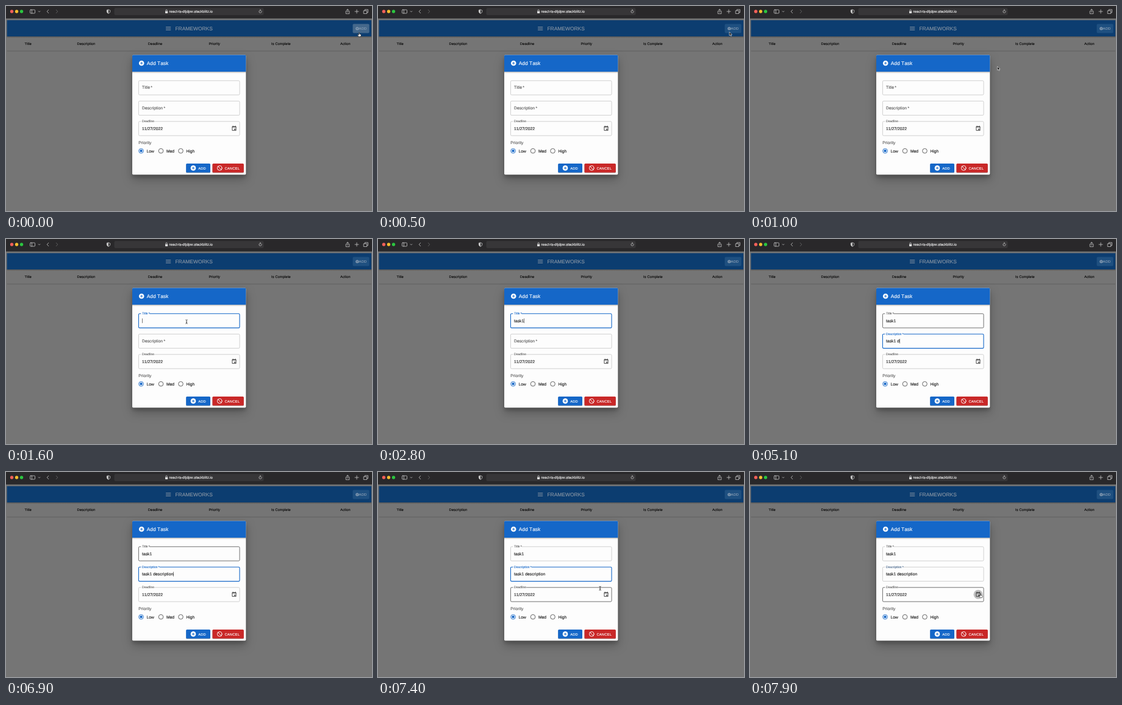
Recreate the animation shown at these times as an HTML page. Size 600 by 337 pixels, loop 8000 ms.

```html
<!DOCTYPE html>
<html lang="en">
<head>
<meta charset="utf-8">
<title>Add Task</title>
<style>
  html, body { margin: 0; width: 100%; height: 100%; overflow: hidden; background: #757575; }
  svg { display: block; width: 100vw; height: 100vh; font-family: "Liberation Sans", Arial, sans-serif; }
  text {
    white-space: pre; font-kerning: none; text-rendering: geometricPrecision;
    fill: currentColor; stroke: currentColor; stroke-width: .13px;
  }
  .body { font-size: 6.7px; letter-spacing: .06px; }
  .small { font-size: 5.85px; letter-spacing: .06px; }
  .button { font-size: 5.83px; letter-spacing: .17px; }
  .line { fill: none; stroke-linecap: round; stroke-linejoin: round; }
</style>
</head>
<body>
<svg id="stage" viewBox="0 0 600 337">
  <defs>
    <filter id="shadow" x="-30%" y="-30%" width="160%" height="170%" color-interpolation-filters="sRGB">
      <feDropShadow dx="0" dy="4.6" stdDeviation="2.6" flood-opacity=".16"/>
      <feDropShadow dx="0" dy="7" stdDeviation="8" flood-opacity=".26"/>
    </filter>
    <filter id="lift" x="-20%" y="-30%" width="140%" height="180%" color-interpolation-filters="sRGB">
      <feDropShadow dx="0" dy=".8" stdDeviation=".7" flood-opacity=".3"/>
    </filter>
    <filter id="soft" x="-10%" y="-200%" width="120%" height="500%"><feGaussianBlur stdDeviation="5 1.2"/></filter>
    <linearGradient id="under" x2="0" y2="1">
      <stop stop-opacity=".28"/><stop offset="1" stop-opacity="0"/>
    </linearGradient>
    <g id="plus">
      <circle r="4.3" fill="#fff"/>
      <path d="M-2.2 0H2.2M0-2.2V2.2" stroke="#1567c8" stroke-width=".95"/>
    </g>
  </defs>

  <!-- Page behind the dialog -->
  <rect width="600" height="337" fill="#757575"/>
  <rect x="1.5" y="23.3" width="597.5" height="26.7" fill="#0c3d70"/>
  <rect x="1.5" y="50" width="597.5" height="2.6" fill="url(#under)"/>
  <path d="M262 34.6h8.2M262 37h8.2M262 39.4h8.2" stroke="#8b97a5" stroke-width=".9"/>
  <text x="277.4" y="39.6" font-size="8.38" letter-spacing=".05" color="#8b97a5">FRAMEWORKS</text>
  <rect x="568.5" y="29.5" width="27" height="15" rx="1.7" fill="#1f5080"/>
  <rect id="press" x="568.5" y="29.5" width="27" height="15" rx="1.7" fill="#7f8c9a"/>
  <circle cx="575.8" cy="37" r="2.6" fill="#8b9fb4"/>
  <path d="M574.4 37h2.8M575.8 35.6v2.8" stroke="#1f5080" stroke-width=".6"/>
  <text x="578.6" y="39.2" class="button" color="#8b9fb4">ADD</text>
  <g id="columns" class="small" color="#0c0c0c"></g>
  <path d="M1.5 74H599" stroke="#585858" stroke-width=".7"/>
  <path d="M88 337H512" stroke="#333" stroke-width="2.4" filter="url(#soft)"/>

  <!-- Browser toolbar -->
  <rect width="600" height="20.5" fill="#29282a"/>
  <circle cx="9.5" cy="9" r="2.7" fill="#f6605a"/>
  <circle cx="17.5" cy="9" r="2.7" fill="#f7bd2e"/>
  <circle cx="25.5" cy="9" r="2.7" fill="#2bc640"/>
  <g class="line" stroke="#c8c8c8" stroke-width=".8">
    <rect x="39.5" y="6.2" width="8" height="5.8" rx="1"/>
    <path d="M42.3 6.2v5.8M53.2 8.5l1.3 1.3 1.3-1.3M69.8 6.3L67.2 9l2.6 2.7"/>
    <path d="M82.2 6.3L84.8 9l-2.6 2.7" stroke="#6a6a6a"/>
    <path d="M168 6l2.7 1v2.2q0 2-2.7 3.2q-2.7-1.2-2.7-3.2V7z"/>
    <path d="M168 6v6.4q-2.7-1.2-2.7-3.2V7z" fill="#c8c8c8" stroke="none"/>
    <path d="M558.4 8.3h-1.2v4.4h5.6V8.3h-1.2M560 10.3V5.3M558.4 6.8l1.6-1.6 1.6 1.6"/>
    <path d="M572 9h6M575 6v6"/>
    <path d="M588.2 7.7V5.8h5.2v4.9h-1.8M586.6 7.7h5v4.8h-5z"/>
  </g>
  <rect x="177.5" y="3.3" width="245" height="11.8" rx="2.4" fill="#373638"/>
  <rect x="261" y="8.5" width="4.2" height="3.4" rx=".6" fill="#ddd"/>
  <path d="M261.9 8.5V7.3a1.2 1.2 0 0 1 2.4 0V8.5" class="line" stroke="#ddd" stroke-width=".7"/>
  <text x="267.6" y="11.3" font-size="5.95" color="#f2f2f2">react-ts-dtjdpw.stackblitz.io</text>
  <path d="M419 8.2a2.2 2.2 0 1 1-1.6-1.3M416.6 5.7l1.3 1.2-1.3 1.2" class="line" stroke="#ccc" stroke-width=".7"/>

  <!-- Dialog -->
  <rect x="207" y="80.6" width="186.3" height="196.6" rx="1.7" fill="#fdfdfd" filter="url(#shadow)"/>
  <path d="M207 108V82.3q0-1.7 1.7-1.7H391.6q1.7 0 1.7 1.7V108z" fill="#1567c8"/>
  <rect x="207" y="108" width="186.3" height="2.8" fill="url(#under)"/>
  <use href="#plus" x="222.2" y="94"/>
  <text x="230.7" y="97" font-size="8.33" letter-spacing=".05" color="#fff">Add Task</text>
  <g id="fields"></g>
  <circle id="ripple" cx="374" cy="201.3" fill="#000"/>
  <g fill="none" stroke="#3c3c3c">
    <path d="M370.9 198.3h6.2v6.3h-6.2zM372.2 196.7v1.6M375.8 196.7v1.6" stroke-width=".9"/>
    <path d="M370.9 198.7h6.2" stroke-width="1.4"/>
    <path d="M374.2 202.7h2" stroke-width="2"/>
  </g>
  <text x="217.2" y="226.7" class="body" color="#5c5c5c">Priority</text>
  <g id="radios" class="body" color="#1c1c1c"></g>
  <g filter="url(#lift)">
    <rect x="295.2" y="259" width="39.8" height="14.8" rx="1.6" fill="#1567c8"/>
    <rect x="338.4" y="259" width="51.4" height="14.8" rx="1.6" fill="#c92828"/>
  </g>
  <use href="#plus" x="307" y="266.4"/>
  <text x="315.2" y="268.6" class="button" color="#fff">ADD</text>
  <g class="line" stroke="#fff" stroke-width=".95">
    <circle cx="350.2" cy="266.4" r="3.8"/><path d="M347.5 263.7l5.4 5.4"/>
  </g>
  <text x="358.4" y="268.6" class="button" color="#fff">CANCEL</text>

  <!-- Pointer shapes, origin at the hot spot -->
  <g id="pointer">
    <path id="arrow" d="M0 0V6L1.5 4.7 2.5 6.9 3.5 6.5 2.6 4.4H4.4z" fill="#111" stroke="#fff" stroke-width=".6"/>
    <path id="hand" d="M-.7.2Q-.6-2.7 0-2.7T.7.2L2.5.7Q3.4 1 3.1 2.2L2.4 4.2H-1L-2.8 1.5Q-2.7.7-1.8 1.1L-.8 1.9z" fill="#fff" stroke="#111" stroke-width=".6"/>
    <path id="beam" d="M-1.3-3.2Q0-3.2 0-2.3Q0-3.2 1.3-3.2M0-2.3V2.3M-1.3 3.2Q0 3.2 0 2.3Q0 3.2 1.3 3.2M-.7.8H.7" class="line" stroke="#222" stroke-width=".7"/>
  </g>
</svg>

<script>
const LOOP = 8000, BLUE = '#1567c8';
const el = id => document.getElementById(id);
const clamp = v => Math.min(1, Math.max(0, v));
const progress = (t, start, length) => clamp((t - start) / length);
const easeOut = p => 1 - (1 - p) ** 3;
const easeInOut = p => p * p * (3 - 2 * p);
const lerp = (a, b, p) => a + (b - a) * p;

function set(node, attrs) {
  for (const name in attrs) node.setAttribute(name, attrs[name]);
}
function add(parent, tag, attrs, content = '') {
  const node = document.createElementNS('http://www.w3.org/2000/svg', tag);
  set(node, attrs);
  node.textContent = content;
  return parent.appendChild(node);
}

[['Title', 30.6], ['Description', 116.5], ['Deadline', 232.8], ['Priority', 332.4],
 ['Is Complete', 434.8], ['Action', 548]].forEach(([name, x]) =>
  add(el('columns'), 'text', { x, y: 64 }, name));

[['Low', 221.5], ['Med', 254], ['High', 286.5]].forEach(([name, x], i) => {
  const g = el('radios');
  add(g, 'circle', { cx: x, cy: 238.2, r: 3.8, fill: 'none', stroke: i ? '#555' : BLUE, 'stroke-width': .9 });
  if (!i) add(g, 'circle', { cx: x, cy: 238.2, r: 2.1, fill: BLUE });
  add(g, 'text', { x: x + 8.9, y: 240.5 }, name);
});

// keys: the moment each character of the value is typed
const fields = [
  { label: 'Title\u2009*', y: 122.8, gap: 14, value: 'task1', focus: 1400, blur: 3200,
    keys: [2000, 2200, 2400, 2600, 2800] },
  { label: 'Description\u2009*', y: 156.3, gap: 30.5, value: 'task1 description', focus: 3200, blur: 7780,
    keys: [3600, 3800, 3900, 4100, 4400, 4800, 5000, 5300, 5500, 5800, 5900, 6100, 6200, 6350, 6500, 6650, 6800] },
  { label: 'Deadline', y: 189.8, gap: 22, value: '11/27/2022', focus: -1e4, blur: -5e3, keys: [] }
];
for (const f of fields) {
  const g = el('fields');
  f.box = add(g, 'rect', { x: 217.4, y: f.y, width: 165.6, height: 23.3, rx: 1.7, fill: 'none' });
  f.notch = add(g, 'rect', { x: 221.3, y: f.y - 1, height: 2, fill: '#fdfdfd' });
  f.name = add(g, 'text', { class: 'body' }, f.label);
  f.text = add(g, 'text', { class: 'body', x: 223, y: f.y + 13.7, color: '#1c1c1c' });
  f.caret = add(g, 'rect', { y: f.y + 7.8, width: .6, height: 7.6, fill: '#222' });
}

const isOver = (f, [x, y]) => x > 217 && x < 383 && y > f.y && y < f.y + 23.3;

const ADD_SPOT = [576, 42.6], TITLE_SPOT = [296, 136], CALENDAR_SPOT = [378, 202.5];
function pointerAt(t) {
  const travel = (a, b, p) => a.map((v, i) => lerp(v, b[i], p));
  if (t < 600) return travel([579, 46], ADD_SPOT, progress(t, 100, 300));
  if (t < 5000) return travel(ADD_SPOT, TITLE_SPOT, easeInOut(progress(t, 600, 700)));
  return travel(TITLE_SPOT, CALENDAR_SPOT, easeInOut(progress(t, 6980, 570)));
}

function drawField(f, t, pointer) {
  const focused = t >= f.focus && t < f.blur;
  const float = easeOut(progress(t, f.focus, 200));
  const tint = progress(t, f.focus, 200) - progress(t, f.blur, 200);
  const typed = f.keys.length ? f.keys.filter(k => k <= t).length : f.value.length;

  set(f.box, {
    stroke: focused ? BLUE : isOver(f, pointer) ? '#333' : '#bdbdbd',
    'stroke-width': focused ? 1.1 : .7
  });
  set(f.notch, { width: f.gap * float });
  set(f.name, { transform: `translate(223 ${f.y + lerp(13.4, 1.4, float)}) scale(${lerp(1, .75, float)})` });
  f.name.style.color = `color-mix(in srgb, ${BLUE} ${tint * 100}%, #5c5c5c)`;
  f.text.textContent = f.value.slice(0, typed);

  const lastEdit = typed && f.keys.length ? f.keys[typed - 1] : f.focus;
  const visible = focused && (t - lastEdit) % 1060 < 530;
  set(f.caret, {
    x: 223 + (typed ? f.text.getComputedTextLength() : 0),
    visibility: visible ? 'visible' : 'hidden'
  });
}

function draw(t) {
  const pointer = pointerAt(t), [x, y] = pointer;
  set(el('press'), { opacity: .4 * (1 - progress(t, 0, 450)) });
  fields.forEach(f => drawField(f, t, pointer));

  const onCalendar = Math.hypot(x - 374, y - 201.3) < 8;
  const onField = fields.some(f => isOver(f, pointer));
  const shape = t < 250 || onCalendar ? 'hand' : onField ? 'beam' : 'arrow';
  for (const id of ['arrow', 'hand', 'beam']) set(el(id), { display: id === shape ? 'inline' : 'none' });
  set(el('pointer'), {
    transform: `translate(${x} ${y})`,
    display: t >= 2000 && t < 6980 ? 'none' : 'inline'
  });

  const press = easeOut(progress(t, 7780, 150));
  set(el('ripple'), { r: 7.5, opacity: onCalendar ? lerp(.05, .25, press) : 0 });
}

function tick(now) {
  draw(now % LOOP);
  requestAnimationFrame(tick);
}
draw(0);
requestAnimationFrame(tick);
</script>
</body>
</html>
```
